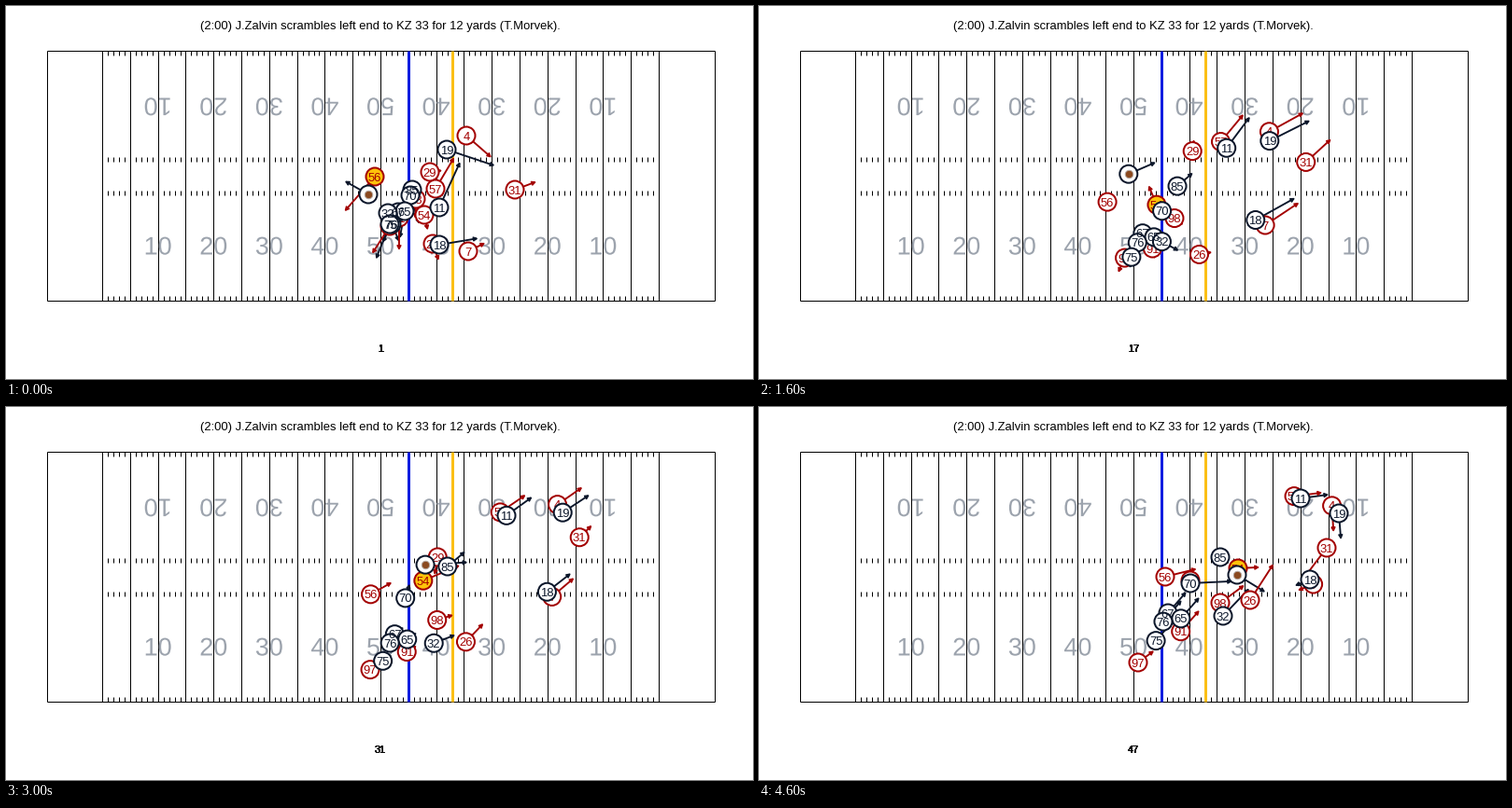
Write a matplotlib script that moves like this. It is 800x400 px and loops after 4.7 s.

```python
import numpy as np
import matplotlib.pyplot as plt
from matplotlib.animation import FuncAnimation
from matplotlib.collections import LineCollection, PolyCollection
from matplotlib.patches import PathPatch
from matplotlib.textpath import TextPath
from matplotlib.transforms import Affine2D

plt.rcParams["font.family"] = "Liberation Sans"

W, H, FRAMES, STEP = 800, 400, 47, 100
SPAN = (FRAMES - 1) * STEP / 1000           # seconds from first to last pose
PT = 0.72                                   # points per pixel at 100 dpi
LEFT, RIGHT, TOP, BOTTOM = 43.5, 758.5, 48, 316
YARD = (RIGHT - LEFT) / 120
NAVY, RED, GOLD, GREY = "#0b162a", "#a30000", "#ffc20a", "#9ca3ad"

fig = plt.figure(figsize=(W / 100, H / 100), dpi=100, facecolor="white")
ax = fig.add_axes([0, 0, 1, 1])
ax.set(xlim=(0, W), ylim=(H, 0))
ax.axis("off")


def label(x, y, s, size, color="black", z=1):
    """Text whose digits are centred on (x, y)."""
    return ax.text(x, y + 0.35 * size, s, fontsize=size * PT, color=color,
                   ha="center", va="baseline", zorder=z)


def yard_number(x, y, s, flip):
    """Two large digits, turned upside down on the far side."""
    size = 27
    place = Affine2D().translate(-0.556 * size, -0.35 * size).scale(1, -1)
    if flip:
        place.rotate_deg(180)
    glyphs = TextPath((0, 0), s, size=size).transformed(place.translate(x, y))
    ax.add_patch(PathPatch(glyphs, facecolor=GREY, linewidth=0, zorder=1))


def yard_x(yards):
    return LEFT + (yards + 10) * YARD


def draw_field():
    line = dict(colors="black", linewidths=PT, zorder=1)
    ax.vlines([LEFT, RIGHT], TOP, BOTTOM, **line)
    ax.hlines([TOP, BOTTOM], LEFT, RIGHT, **line)
    ax.vlines(yard_x(np.arange(0, 101, 5)), TOP, BOTTOM, **line)
    for y in (TOP, 162, 198, BOTTOM - 5):
        ax.vlines(yard_x(np.arange(0, 101)), y, y + 5, **line)
    for yards in range(10, 100, 10):
        s = str(min(yards, 100 - yards))
        yard_number(yard_x(yards), 257, s, False)
        yard_number(yard_x(yards), 108, s, True)
    for yards, color in ((55, "#0a1ee0"), (63, "#fbbf16")):
        ax.vlines(yard_x(yards), TOP, BOTTOM, colors=color, linewidths=3 * PT, zorder=2)
    label(401, 20.3, "(2:00) J.Zalvin scrambles left end to KZ 33 "
                     "for 12 yards (T.Morvek).", 13)


def run(*points):
    """Polynomial path through points evenly spaced in time."""
    n = len(points)
    coef = np.polyfit(np.linspace(0, SPAN, n), points, n - 1)
    return lambda t: np.vander([t], n)[0] @ coef


def shadow(lead, first, last):
    """Stay with another player while the gap eases from first to last."""
    first, last = np.array(first), np.array(last)
    return lambda t: lead(t) + last + (first - last) * np.exp(-t / 1.2)


class Team:
    def __init__(self, players, color, z):
        self.numbers, self.paths = list(players), list(players.values())
        n = len(players)
        self.shafts = LineCollection([], colors=color, linewidths=1.9 * PT, zorder=3)
        self.heads = PolyCollection([], facecolors=color, edgecolors=color,
                                    linewidths=1.5 * PT, zorder=3)
        ax.add_collection(self.shafts)
        ax.add_collection(self.heads)
        self.rings = ax.scatter(np.zeros(n), np.zeros(n), s=(19 * PT) ** 2,
                                facecolors="white", edgecolors=color,
                                linewidths=2 * PT, zorder=z)
        self.names = [label(0, 0, s, 13, color, z + 0.5) for s in self.numbers]

    def update(self, t, marked=None):
        """Place everyone; each arrow shows one second of travel."""
        d = 0.01
        pos = np.array([p(t) for p in self.paths])
        vel = np.array([p(t + d) - p(t - d) for p in self.paths]) / (2 * d)
        tips = pos + vel
        unit = vel / np.maximum(np.hypot(*vel.T), 1e-6)[:, None]
        side = unit[:, ::-1] * [-1, 1]
        back = tips - 3.6 * unit
        self.shafts.set_segments(np.stack([pos, tips], axis=1))
        self.heads.set_verts(np.stack([tips, back + 1.9 * side, back - 1.9 * side], axis=1))
        self.rings.set_offsets(pos)
        self.rings.set_facecolors([GOLD if s == marked else "white" for s in self.numbers])
        for name, (x, y) in zip(self.names, pos):
            name.set_position((x, y + 0.35 * 13))
        return pos


draw_field()

# Receivers, the line's anchor and the ball carrier lead; others play off them.
wide = run((472, 154), (544, 146), (598, 112), (621, 114))
deep = run((464, 216), (518, 132), (580, 98))
slot = run((464, 256), (529, 231), (581, 197), (590, 185))
anchor = run((420, 221), (412, 246), (438, 221))
guard = shadow(anchor, (7, -1), (14, 6))
tackle = shadow(anchor, (-9, 13), (-13, 30))
carrier = run((388, 202), (394, 181), (452, 169), (512, 180))

offence = Team({
    "85": run((435, 197), (447, 194), (474, 170), (494, 161)),
    "70": run((433, 203), (432, 220), (428, 204), (462, 189)),
    "67": anchor,
    "65": guard,
    "32": run((409, 222), (444, 256), (497, 224)),
    "76": shadow(anchor, (-7, 13), (-5, 9)),
    "75": tackle,
    "19": wide,
    "11": deep,
    "18": slot,
    "": carrier,
}, NAVY, 6)

defence = Team({
    "56": run((395, 183), (373, 210), (392, 200), (435, 182)),
    "29": run((454, 178), (463, 162), (464, 153), (461, 170), (462, 186)),
    "57": shadow(deep, (-4, -20), (-7, -2)),
    "98": run((439, 207), (452, 230), (494, 210)),
    "54": run((448, 224), (432, 221), (428, 199), (466, 180), (513, 173)),
    "91": shadow(guard, (-6, 7), (0, 14)),
    "97": run((411, 236), (389, 278), (406, 274)),
    "26": run((457, 255), (481, 262), (526, 207)),
    "7": shadow(slot, (31, 7), (3, 5)),
    "4": shadow(wide, (21, -15), (-8, -8)),
    "31": run((545, 197), (584, 169), (615, 139), (608, 151)),
}, RED, 4)

ball = ax.scatter([0], [0], s=(8.5 * PT) ** 2, facecolors="#8b4a20",
                  edgecolors="#b5aaa4", linewidths=PT, zorder=8)
# Stacked copies harden the edges of the small counter.
counter = [label(401, 367, "", 11) for _ in range(12)]


def likely_tackler(t):
    if t < 0.95:
        return "56"
    return "29" if 2.15 < t < 2.75 else "54"


def update(i):
    t = i * STEP / 1000
    defence.update(t, likely_tackler(t))
    ball.set_offsets(offence.update(t)[-1:])
    for c in counter:
        c.set_text(str(i + 1))
    return []


anim = FuncAnimation(fig, update, frames=FRAMES, interval=STEP, repeat=True,
                     repeat_delay=0, blit=False)
plt.show()
```
